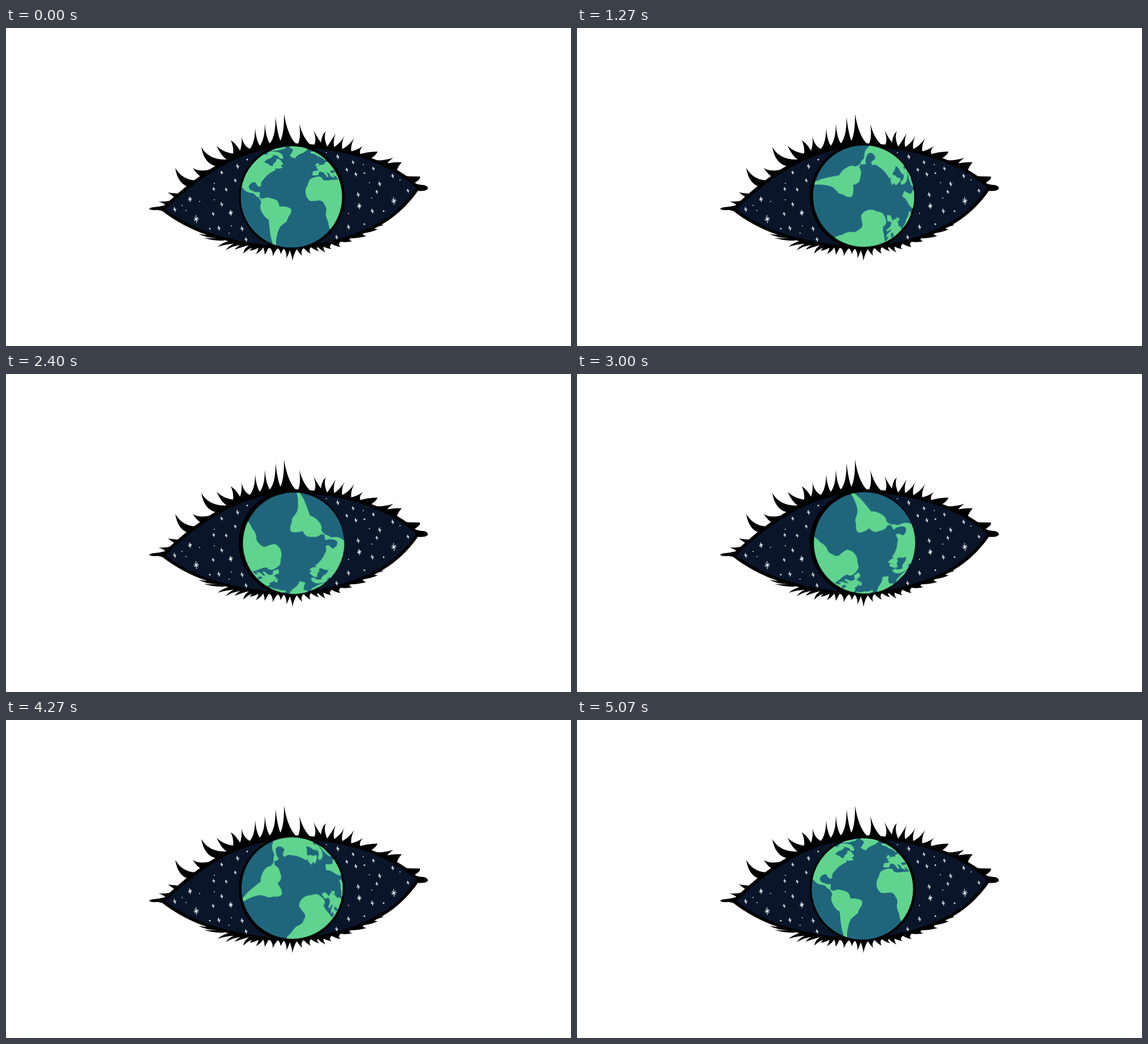
Recreate the animation shown at these times as an HTML page. Size 998 by 561 pixels, loop 5.14 s.

```html
<!DOCTYPE html>
<html lang="en">
<head>
<meta charset="utf-8">
<title>Earth eye</title>
<style>
  html, body { margin: 0; width: 100%; height: 100%; overflow: hidden; background: #fff; }
  svg { display: block; width: 100vw; height: 100vh; }
  .sea { fill: #1f667d; }
  .land { fill: #60d48f; }
  .stars path { fill: none; stroke: #e8f0f2; stroke-width: 1.1; stroke-linecap: round; }
  .stars circle { fill: #cfd9df; }

  /* the disc swings out and back, 15 steps a second */
  .globe { transform-origin: 506px 298.5px; animation: swing 5140ms infinite; }
  @keyframes swing {
    0% { transform: rotate(0deg); animation-timing-function: linear; }
    1.284% { transform: rotate(0deg); animation-timing-function: steps(37, end); }
    49.274% { transform: rotate(175.26deg); animation-timing-function: linear; }
    50.564% { transform: rotate(175.26deg); animation-timing-function: steps(37, end); }
    98.56%, 100% { transform: rotate(0deg); }
  }
</style>
</head>
<body>
<svg viewBox="0 0 998 561">
  <defs>
    <clipPath id="disc"><circle cx="504" cy="298" r="89.6"/></clipPath>
  </defs>

  <g class="lashes">
    <path d="M284 312Q272 315 262 316Q253 317 253 319Q256 322 268 321L282 324Z
      M294 303Q284 307 269 306Q280 309 284 315Z
      M306 292Q298 292 286 290Q294 296 300 300L318 284Z
      M319 279Q303 272 299 247Q312 269 338 269L326 282Z
      M348 264Q339 261 330 247Q344 256 368 247L362 256Z
      M371 244Q350 239 345 210Q358 233 390 232L382 242Z
      M392 234Q380 226 372 208Q387 222 409 222L404 230Z
      M400 228Q404 213 397 198Q409 206 416 222Z
      M410 225Q418 209 416 190Q419 211 436 215Z"/>
    <path d="M424 219Q440 210 440 177Q443 207 453 212Z
      M439 215Q458 207 457 168Q460 204 472 209Z
      M455 211Q477 205 476 157Q481 200 490 207Z
      M478 208Q492 197 491 151Q498 194 516 208Z
      M514 208Q522 196 518 169Q525 196 540 208Z
      M543 209Q550 199 543 180Q552 198 562 209Z
      M556 209Q556 190 565 182Q560 193 568 211Z
      M566 211Q576 197 582 186Q577 199 580 212Z
      M576 212Q590 205 598 190Q592 202 594 214Z
      M590 215Q605 210 615 194Q608 208 610 219Z"/>
    <path d="M606 218Q618 217 631 208Q623 215 626 223Z
      M620 224Q638 218 656 218Q656 222 645 230L640 232Z
      M644 232Q662 236 684 229Q674 236 672 242Z
      M664 241Q684 236 699 237Q693 243 690 252Z
      M700 261Q716 262 731 262Q733 267 722 273L714 274Z
      M715 272Q730 277 738 277Q746 279 745 284Q740 289 726 287Z"/>
    <path d="M366 365Q354 366 340 363Q352 370 374 371Z
      M378 370Q364 372 349 370Q365 376 386 375Z
      M398 375Q382 378 374 386Q388 381 410 380Z
      M410 378Q396 381 388 392Q401 384 418 382Z
      M420 380Q409 384 404 391Q415 387 429 383Z
      M432 382Q421 387 419 398Q429 388 443 385Z
      M440 384Q433 388 431 393Q442 391 450 385Z
      M446 385Q446 393 441 399Q451 394 455 386Z
      M454 386Q457 393 457 400Q461 394 464 387Z
      M465 387Q472 393 471 403Q475 393 481 388Z
      M480 388Q485 393 485 399Q488 393 491 388Z
      M490 388Q497 397 495 407Q500 398 502 389Z
      M499 388Q505 399 506 411Q508 398 515 388Z"/>
    <path d="M512 388Q517 396 523 402Q520 393 526 387Z
      M525 387Q530 394 538 398Q534 391 539 386Z
      M538 386Q545 392 553 394Q547 388 552 384Z
      M549 385Q556 392 564 396Q559 388 562 383Z
      M558 384Q566 389 575 390Q569 386 576 380Z
      M574 380Q584 386 591 386Q585 382 592 376Z
      M590 377Q602 379 612 376Q604 375 608 370Z
      M609 371Q622 371 637 367Q629 366 630 360Z
      M629 362Q644 361 657 355Q648 355 650 350Z
      M646 352Q658 351 668 347Q660 348 661 343Z"/>
  </g>

  <path d="M277 320C306 292 347 257 394 233C436 212 476 206 506 206
    C564 207 617 220 655 236C684 248 709 263 728 282
    C705 316 680 336 652 350C613 370 561 386 506 387
    C450 388 399 377 357 363C326 352 300 338 277 320Z"
    fill="#0a152a" stroke="#000" stroke-width="5.5" stroke-linejoin="round"/>
  <path d="M274 319C306 288 347 254 394 231C436 210 476 204 506 204
    C564 205 617 218 655 234C684 246 711 260 731 282
    C708 267 684 251 655 238C617 223 564 210 506 210
    C476 210 438 216 396 236C349 260 308 292 279 321Z"/>
  <g class="stars" id="stars"></g>

  <circle cx="504.7" cy="297.6" r="93.7"/>
  <g class="globe">
    <g clip-path="url(#disc)">
      <circle class="sea" cx="504" cy="298" r="89.6"/>
      <g class="land">
        <path d="M410 276L418 282Q422 288 428 290L438 292Q442 299 451 300L454 303L447 302
          Q449 294 448 289Q443 291 437 288Q428 285 429 279Q432 272 440 272
          Q443 277 446 280L451 279Q449 272 455 267Q461 259 468 255L477 250L475 247
          Q482 250 489 246L485 243L490 240Q487 236 484 232L478 230Q478 237 472 239
          Q473 245 467 243Q464 239 456 237Q460 231 467 230L473 225L466 222L458 224
          L450 216L408 240Z"/>
        <path d="M466 218Q478 217 485 221Q491 226 489 231L483 230Q482 225 473 224L460 222Z"/>
        <path d="M472 213L484 212L495 209L492 213L480 216L468 217Z"/>
        <path d="M501 207L534 208L532 215Q527 220 520 222Q513 225 511 230
          Q505 229 501 225Q505 221 507 215Q505 212 501 211Z"/>
        <path d="M449 304Q456 299 463 299Q470 301 474 302Q482 304 483 315
          Q494 314 502 318Q506 321 502 329Q498 333 496 341Q489 346 484 351
          Q480 358 479 365Q477 372 477 382L476 390L470 389L471 380
          Q467 369 466 358L464 338Q456 334 451 323Q447 315 451 308Z"/>
        <path d="M537 267Q545 262 553 262Q559 263 560 268Q568 270 574 268L592 267
          L600 300L590 340L574 357Q570 352 569 342Q564 332 565 326
          Q568 318 562 311Q561 306 554 304Q545 306 537 305Q529 299 529 289
          Q529 282 533 277Q534 271 537 267Z"/>
        <path d="M548 246Q555 240 563 241Q560 237 567 236L576 236L594 262L588 269
          L583 262L578 260L581 265L574 262L570 256L566 254L570 262L567 263L561 255
          L554 253L551 260L541 260L542 253L552 251Z"/>
        <path d="M538 218L552 218L565 230L564 234Q558 228 550 226Q547 222 538 221Z"/>
        <path d="M546 244L549 238L554 240L551 244Z"/>
      </g>
      <path class="sea" d="M431 276L440 274L441 282L432 284ZM572 252L579 251L581 255L575 256Z"/>
    </g>
  </g>
</svg>
<script>
  // x, y, arm length
  const sparks = [
    [409, 244, 4], [381, 255, 3], [405, 269, 3], [367, 284, 3], [389, 285, 3],
    [325, 302, 4.5], [298, 320, 4], [381, 311, 3.5], [366, 328, 3], [397, 326, 5],
    [336, 337, 6.5], [376, 353, 4], [417, 354, 4], [424, 373, 3.5],
    [586, 227, 4], [613, 237, 3], [649, 248, 3], [602, 250, 3], [618, 258, 3.5],
    [683, 261, 3.5], [660, 275, 4], [622, 294, 4], [655, 289, 3], [685, 305, 6.5],
    [710, 287, 3], [624, 314, 5], [647, 323, 4], [605, 351, 4], [584, 369, 3.5]
  ];
  const dots = [
    [426, 232], [368, 274], [342, 306], [318, 322], [360, 354], [398, 349], [394, 362],
    [566, 220], [633, 256], [642, 273], [696, 268], [646, 300], [667, 323], [605, 327],
    [311, 313], [368, 303], [633, 346], [631, 241]
  ];
  const spark = ([x, y, r]) => {
    const w = r * .65, d = r * .45;
    return `<path d="M${x - .5} ${y - r}L${x + .5} ${y + r}M${x - w} ${y + .5}L${x + w} ${y - .5}` +
      `M${x - d} ${y - d}L${x + d} ${y + d}${r > 4 ? `M${x + d} ${y - d}L${x - d} ${y + d}` : ''}"/>`;
  };
  const dot = ([x, y], i) => `<circle cx="${x}" cy="${y}" r="${i % 4 ? 1 : 1.5}"/>`;
  document.getElementById('stars').innerHTML =
    sparks.map(spark).join('') + dots.map(dot).join('');
</script>
</body>
</html>
```
